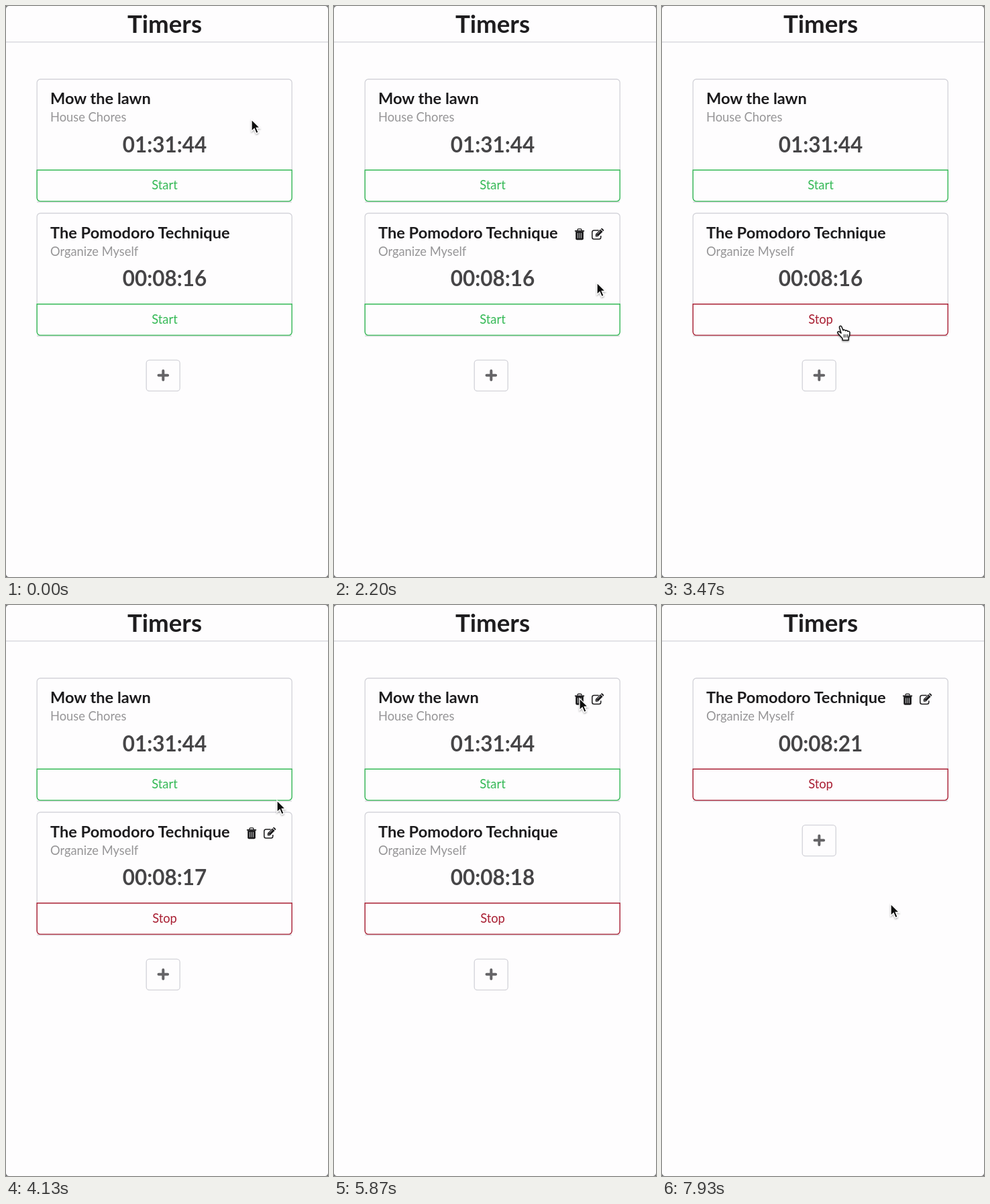
Recreate the animation shown at these times as an HTML page. Size 480 by 850 pixels, loop 8 s.

```html
<!DOCTYPE html>
<html lang="en">
<head>
<meta charset="utf-8">
<title>Timers</title>
<style>
  html, body { margin: 0; width: 100%; height: 100%; overflow: hidden; background: #6c6c6e; }
  svg { display: block; width: 100vw; height: 100vh; font-family: Lato, "Open Sans", sans-serif; }
  .h1 { font-size: 36.7px; font-weight: 700; fill: #1e1d1f; text-anchor: middle; }
  .title { font-size: 23.6px; font-weight: 700; fill: #1c1b1d; }
  .meta { font-size: 18.34px; fill: #969597; }
  .clock { font-size: 31.44px; font-weight: 700; fill: #464547; text-anchor: middle; }
  .label { font-size: 18.34px; text-anchor: middle; }
  .line { fill: none; stroke: #d3d3d9; stroke-width: 1.3; }
</style>
</head>
<body>
<svg viewBox="0 0 480 850">
  <defs>
    <g id="icons" fill="#1d1c1e">
      <path d="M363 134.6v-.6a1.6 1.6 0 0 1 1.6-1.6h2.9a1.6 1.6 0 0 1 1.6 1.6v.6" fill="none" stroke="#1d1c1e" stroke-width="1.4"/>
      <rect x="358.9" y="134.4" width="14.3" height="1.8" rx=".6"/>
      <path d="M360.2 136h11.7v10.8a2 2 0 0 1-2 2h-7.7a2 2 0 0 1-2-2z"/>
      <path d="M363.4 138.4v7.8M366 138.4v7.8M368.6 138.4v7.8" stroke="#d9d8da" stroke-width=".9"/>
      <path d="M394.6 134.4h-7a2.8 2.8 0 0 0-2.8 2.8v7.6a2.8 2.8 0 0 0 2.8 2.8h7.4a2.8 2.8 0 0 0 2.8-2.8v-2.4" fill="none" stroke="#1d1c1e" stroke-width="1.5"/>
      <path d="M389.8 143.8v-3.5l7.3-7.3 3.5 3.5-7.3 7.3z"/>
      <path d="M397.8 132.3l.6-.6a1.1 1.1 0 0 1 1.6 0l1.9 1.9a1.1 1.1 0 0 1 0 1.6l-.6.6z"/>
      <path d="M392.6 139.6l4.4-4.4M391 141l1.6 1.6" stroke="#fefdfe" stroke-width=".8"/>
    </g>
    <filter id="soft" x="-50%" y="-50%" width="200%" height="200%">
      <feDropShadow dx="0" dy="1.5" stdDeviation="1.3" flood-opacity=".35"/>
    </filter>
  </defs>
  <rect width="480" height="850" rx="4.5" fill="#fefdfe"/>
  <path class="line" d="M0 53.7H480"/>
  <text class="h1" x="236.5" y="40">Timers</text>
  <g id="cards"></g>
  <g id="plus">
    <rect class="line" x="209.2" y="527.2" width="50" height="46" rx="4.5"/>
    <path d="M227.5 549.8h13.6M234.3 543v13.6" stroke="#656467" stroke-width="4" stroke-linecap="round" stroke-linejoin="round"/>
  </g>
  <g id="arrow" filter="url(#soft)">
    <path d="M0 0V17.4L4.1 13.7L7 20.6L10.2 19.2L7.3 12.5H12.6Z" fill="#0c0c0c" stroke="#fff" stroke-width="1.3"/>
  </g>
  <g id="hand" filter="url(#soft)">
    <path d="M7 12.2L4.6 4C3.6 1.3 6.8.6 7.8 2.8L10 8C10.8 6.8 13 7 13.4 8.6C14.4 7.6 16.4 8 16.8 9.6C18 8.9 19.8 9.6 19.9 11.4C20.1 14 19.2 17 18 19V22.6H9V20C7 18 4 14.5 2 12.2C.8 10.4 2.8 9 4.6 10.2Z" fill="#fff" stroke="#151515" stroke-width="1.5" stroke-linejoin="round"/>
    <path d="M11.4 14v4.6M14 14v4.6M16.6 14v4.6" stroke="#151515" stroke-width="1.1"/>
  </g>
</svg>
<script>
const LOOP = 8000, STEP = 200 / 3, ROW = 199.5;
const START_AT = 2930, FIRST_TICK = 3900, REMOVE_AT = 6600;
const GREEN = '#35b956', GREEN_HOVER = '#27a94a', RED = '#a91f33';
const $ = id => document.getElementById(id);

// Pointer stops: time, x, y
const path = [
  [0, 366, 169], [267, 384, 134], [533, 400, 126], [933, 402, 150],
  [1330, 406, 156], [1670, 417, 200], [2130, 397, 402], [2200, 392, 412],
  [2467, 330, 455], [2730, 255, 464], [3130, 255, 464], [3600, 270, 480],
  [3870, 400, 510], [3930, 446, 568], [4133, 404, 291], [4400, 376, 200],
  [4730, 373, 160], [5600, 366, 143], [5867, 366, 139], [7330, 366, 139],
  [7600, 372, 170], [7930, 341, 445], [8000, 341, 445]
];
const lawnIcons = [[60, 1710], [4190, REMOVE_AT]];
const pomoIcons = [[1860, 2390], [3990, 4190], [6720, LOOP]];

function makeCard(title, meta) {
  const g = document.createElementNS('http://www.w3.org/2000/svg', 'g');
  g.innerHTML = `
    <path d="M47 291.8H425" stroke="#dedde1" stroke-width="2" stroke-linecap="round"/>
    <rect class="line" x="46.2" y="109" width="380" height="181.6" rx="5"/>
    <text class="title" x="66" y="146">${title}</text>
    <text class="meta" x="66" y="172.3">${meta}</text>
    <text class="clock" x="236.5" y="217.5"></text>
    <path class="button" d="M46.2 244.2h380v41.4a5 5 0 0 1-5 5h-370a5 5 0 0 1-5-5z" fill="#fefdfe" stroke-width="1.4"/>
    <text class="label" x="236.5" y="273.4"></text>
    <use href="#icons"/>`;
  $('cards').append(g);
  const find = s => g.querySelector(s);
  return { g, clock: find('.clock'), button: find('.button'), label: find('.label'), icons: find('use') };
}

const lawn = makeCard('Mow the lawn', 'House Chores');
const pomo = makeCard('The Pomodoro Technique', 'Organize Myself');

const show = (el, on) => el.setAttribute('visibility', on ? 'visible' : 'hidden');
const move = (el, x, y) => el.setAttribute('transform', `translate(${x} ${y})`);
const within = (spans, t) => spans.some(([a, b]) => t >= a && t < b);

function pointerAt(t) {
  const i = Math.max(1, path.findIndex(p => p[0] >= t));
  const [t0, x0, y0] = path[i - 1], [t1, x1, y1] = path[i];
  const u = (t - t0) / (t1 - t0), k = u * u * (3 - 2 * u);
  return [x0 + (x1 - x0) * k, y0 + (y1 - y0) * k];
}

const overButton = (x, y, top) => x > 46 && x < 426 && y > top + 244 && y < top + 290;

function setCard(card, time, running, hover, icons) {
  const color = running ? RED : hover ? GREEN_HOVER : GREEN;
  card.clock.textContent = time;
  card.label.textContent = running ? 'Stop' : 'Start';
  card.label.setAttribute('fill', color);
  card.button.setAttribute('stroke', color);
  show(card.icons, icons);
}

function draw(ms) {
  const t = Math.floor((ms % LOOP + 5) / STEP) * STEP % LOOP;
  const removed = t >= REMOVE_AT;
  const top = removed ? 0 : ROW;
  const [x, y] = pointerAt(t);
  const overLawn = !removed && overButton(x, y, 0);
  const overPomo = overButton(x, y, top);
  const seconds = 16 + Math.max(0, Math.floor((t - FIRST_TICK) / 1000) + 1);

  lawn.g.setAttribute('display', removed ? 'none' : 'inline');
  setCard(lawn, '01:31:44', false, overLawn, within(lawnIcons, t));
  setCard(pomo, '00:08:' + seconds, t >= START_AT, overPomo, within(pomoIcons, t));
  move(pomo.g, 0, top);
  move($('plus'), 0, top - ROW);

  const hand = overLawn || overPomo;
  show($('hand'), hand);
  show($('arrow'), !hand);
  move($('arrow'), x, y);
  move($('hand'), x - 7, y - 2);
}

const begin = performance.now();
function tick() {
  draw(performance.now() - begin);
  requestAnimationFrame(tick);
}
tick();
</script>
</body>
</html>
```
